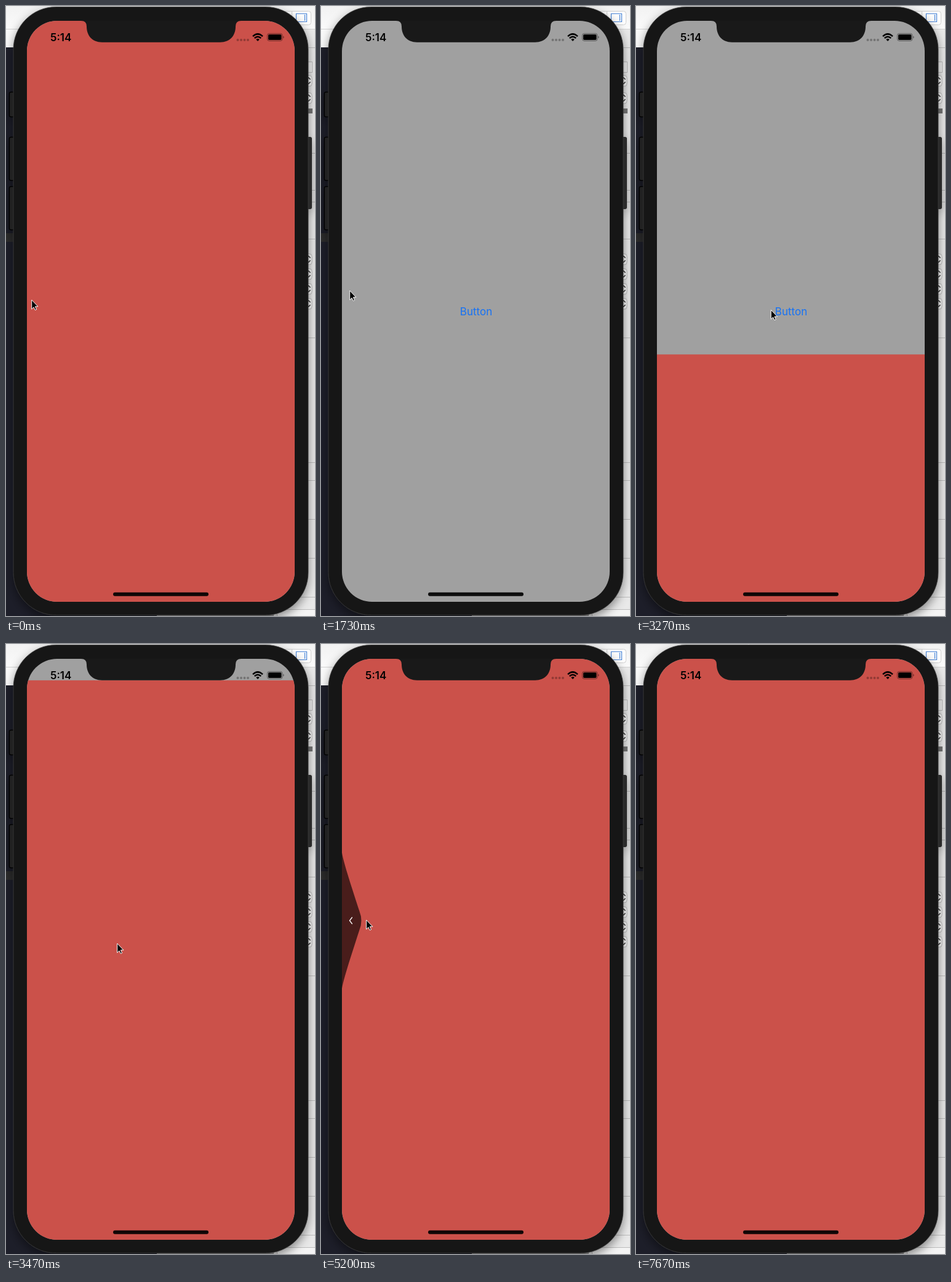
An HTML page for the animation above (7.74 s loop, 502 by 988 pixels).

```html
<!DOCTYPE html>
<html lang="en">
<head>
<meta charset="utf-8">
<title>Edge swipe</title>
<style>
html, body { margin: 0; width: 100%; height: 100%; overflow: hidden; background: #e8e8e8; }
svg { display: block; width: 502px; height: 988px; }
text { font-family: Inter, "Liberation Sans", sans-serif; font-size: 17px; }
</style>
</head>
<body>
<svg viewBox="0 0 502 988">
  <defs>
    <clipPath id="screen"><rect x="34" y="24" width="435" height="941" rx="49"/></clipPath>
    <linearGradient id="bar" x2="0" y2="1"><stop stop-color="#f2f2f2"/><stop offset="1" stop-color="#fafafa"/></linearGradient>
    <filter id="shade" x="-10%" y="-5%" width="120%" height="110%"><feDropShadow dx="0" dy="6" stdDeviation="8" flood-opacity=".45"/></filter>
  </defs>

  <!-- desktop behind the phone -->
  <rect width="502" height="988" fill="#e9e9e9"/>
  <rect width="502" height="37" fill="url(#bar)"/>
  <path d="M0 37.5H502" stroke="#d2d2d2"/>
  <rect y="38" width="250" height="29" fill="#fafafa"/>
  <rect y="67" width="245" height="921" fill="#1d1e29"/>
  <rect y="368" width="20" height="14" fill="#2c2c2c"/>
  <rect x="245" y="980" width="190" height="8" fill="#999"/>
  <rect x="440" y="8.500" width="55.500" height="22" rx="4" fill="#fdfdfd" stroke="#d0d0d0"/>
  <path d="M464.500 8V31" stroke="#d0d0d0"/>
  <path d="M471.500 12.500H488.500V25.500H471.500ZM485.500 14V24" fill="none" stroke="#4a86d8" stroke-width="1.200"/>
  <g id="panel" stroke="#bcbcbc">
    <rect x="480.500" y="90.500" width="17" height="17" fill="#f2f2f2"/>
    <rect x="480" y="166" width="18" height="8" fill="#777" stroke="none"/>
    <rect x="440.500" y="977.500" width="70" height="20" rx="4" fill="#f4f4f4"/>
  </g>

  <!-- phone body -->
  <g filter="url(#shade)">
    <g fill="#222" stroke="#050505" stroke-width="1.500">
      <rect x="5.500" y="139.500" width="12" height="40" rx="2.500"/>
      <rect x="5.500" y="212.500" width="12" height="70" rx="2.500"/>
      <rect x="5.500" y="292.500" width="12" height="70" rx="2.500"/>
    </g>
    <rect x="485" y="212" width="12" height="117" rx="3" fill="#2a2a2a"/>
    <rect x="12" y="1.500" width="479" height="985" rx="69" fill="#191919" stroke="#3a3a3a" stroke-width=".8"/>
  </g>

  <g clip-path="url(#screen)">
    <rect x="34" y="24" width="435" height="941" fill="#a0a0a0"/>
    <text id="button" x="252" y="501" text-anchor="middle" fill="#1672f5">Button</text>
    <rect id="sheet" x="34" width="435" height="960" fill="#cb514a"/>
    <g id="tab">
      <path d="M0-110C2.500-94 17.500-49 28.500-15Q34.500 0 28.500 15C17.500 49 2.500 94 0 110Z" opacity=".64"/>
      <path d="M16.800-5.500L12.500 0L16.800 5.500" fill="none" stroke="#fff" stroke-width="1.300"/>
    </g>
    <path d="M122 23V24Q131 24 131 33C131 48 140 58.700 156 58.700H348C364 58.700 373 48 373 33Q373 24 382 24V23Z" fill="#191919"/>
    <text x="72" y="57" font-weight="600">5:14</text>
    <path d="M376.500 55H394" stroke="#000" stroke-width="4" stroke-linecap="round" stroke-dasharray="0 5.500" opacity=".28"/>
    <g fill="none" stroke="#000" stroke-width="2.500">
      <path d="M401 49.200Q409 41.500 417 49.200M403.800 52.200Q409 47.200 414.200 52.200"/>
      <path d="M406.300 54.200Q409 51.800 411.700 54.200L409 57Z" fill="#000" stroke="none"/>
    </g>
    <rect x="424.500" y="44.500" width="24.500" height="12" rx="3.200" fill="none" stroke="#000" stroke-opacity=".45"/>
    <rect x="426" y="46" width="21.500" height="9" rx="1.800"/>
    <path d="M450.300 48.500Q453 50.500 450.300 52.500Z" opacity=".5"/>
    <rect x="174" y="949.800" width="155" height="6" rx="3" opacity=".92"/>
  </g>
  <path id="cursor" d="M.7 1V16L4 12.800L6.300 17.500L8.600 16.500L6.400 11.800H11Z" stroke="#fff"/>
</svg>
<script>
const $ = id => document.getElementById(id);
const LOOP = 7740, STEP = LOOP / 116;
const DISMISS = 702, PRESENT = 3190;           // sheet leaves, sheet returns
const SWING = 2000 / 3, SWINGS = [4200, 6200]; // repeated swipes that get cancelled
const DRAGS = [[0, 700], [1730, 2250], SWINGS];
const clamp = v => Math.max(0, Math.min(1, v));

// inspector strip showing right of the phone
const line = y => `<path d="M470 ${y}.5H502"/>`;
const stepper = y => `<rect x="470.500" y="${y}.5" width="26.500" height="17.500" rx="4" fill="#fafafa"/>
  <path d="M488.500 ${y + 7}l3-3l3 3M488.500 ${y + 11}l3 3l3-3" fill="none" stroke="#333" stroke-width="1.500"/>`;
let strip = [67, 238, 298, 317, 377, 537, 739].map(line).join('');
for (let y = 768; y < 988; y += 63) strip += line(y);
for (let y = 112; y <= 140; y += 28) strip += stepper(y);
for (let y = 401; y <= 473; y += 24) strip += stepper(y);
$('panel').innerHTML += strip;

// pointer stops: time, x, y
const stops = [
  [0, 41, 475], [700, 188, 485], [870, 170, 483], [1600, 28, 461], [1730, 46, 460],
  [2250, 130, 464], [2730, 228, 493], [PRESENT, 228, 493], [3470, 180, 484],
  [SWINGS[0], 26, 446], [SWINGS[1], 26, 446], [7260, 176, -17], [LOOP, 176, -17]
];

function pointer(t) {
  const i = stops.findIndex(s => s[0] > t);
  const [t0, x0, y0] = stops[i - 1], [t1, x1, y1] = stops[i];
  const u = (t - t0) / (t1 - t0), s = u * u * (3 - 2 * u);
  const swinging = t >= SWINGS[0] && t < SWINGS[1];
  const swing = swinging ? 47 * Math.sin(Math.PI * (t - SWINGS[0]) / SWING) ** 2 : 0;
  return [x0 + (x1 - x0) * s + swing, y0 + (y1 - y0) * s];
}

// critically damped spring from 0 to 1
function spring(ms) {
  const w = Math.max(0, ms) * 0.01826;
  return 1 - (1 + w) * Math.exp(-w);
}

function draw(t) {
  const [x, y] = pointer(t);
  $('cursor').setAttribute('transform', `translate(${x} ${y})`);

  const hidden = t < PRESENT ? spring(t - DISMISS) : 1 - spring(t - PRESENT);
  $('sheet').setAttribute('y', 24 + 941 * hidden);
  $('button').setAttribute('opacity', t > PRESENT - 140 && t < PRESENT ? 0.3 : 1);

  // the tab follows the drag, then slips back after release
  let pull = 0, mid = y;
  const drag = DRAGS.find(([from, to]) => t >= from && t < to + 130);
  if (drag) {
    const [px, py] = pointer(Math.min(t, drag[1]));
    pull = clamp((px - 46) / 26) * (1 - clamp((t - drag[1]) / 130));
    mid = py + 2;
  }
  $('tab').setAttribute('transform', `translate(34 ${mid}) scale(${pull} 1)`);
  $('tab').setAttribute('visibility', pull > 0.01 ? 'visible' : 'hidden');
}

const start = performance.now();
function tick() {
  const t = (performance.now() - start) % LOOP;
  draw(Math.floor((t + 5) / STEP) % 116 * STEP);
  requestAnimationFrame(tick);
}
tick();
</script>
</body>
</html>
```
